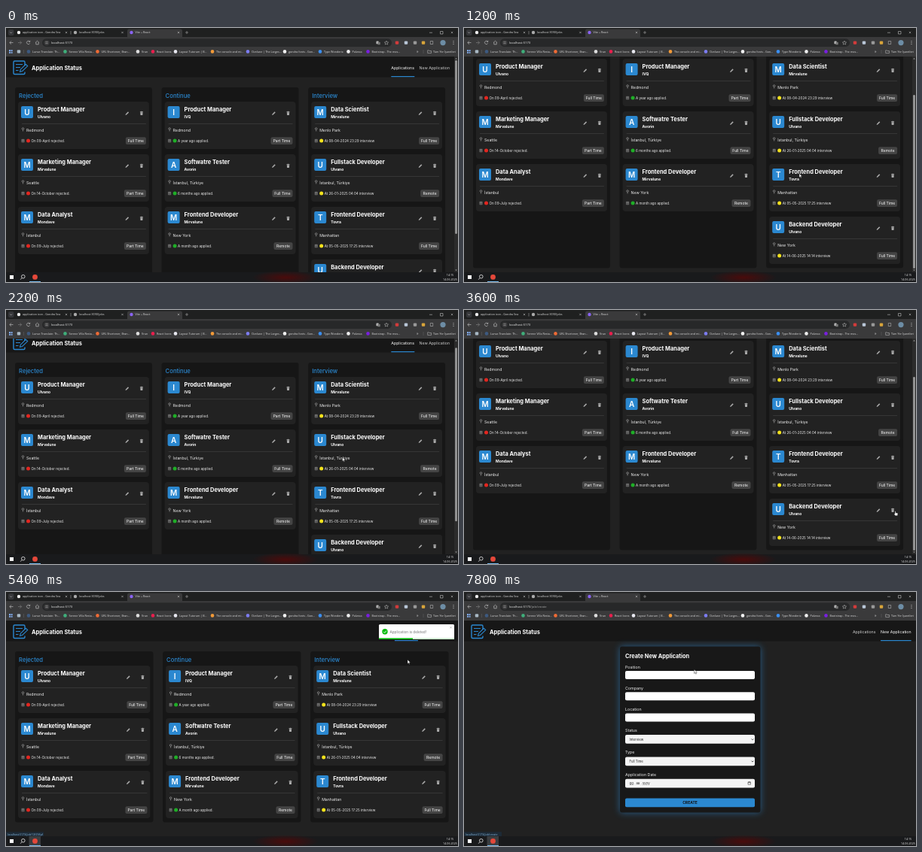
Write an HTML page that moves like this. It is 600x338 px and loops after 8 s.

```html
<!DOCTYPE html>
<html lang="en">
<head>
<meta charset="utf-8">
<title>Application Status</title>
<style>
  html, body { margin: 0; width: 100%; height: 100%; overflow: hidden; background: #202020; }
  svg { display: block; width: 100vw; height: 100vh; font-family: Inter, "Open Sans", sans-serif; }
  .ui { font-family: "Open Sans", "Noto Sans", sans-serif; }
</style>
</head>
<body>
<svg id="stage" viewBox="0 0 600 338" xmlns="http://www.w3.org/2000/svg"></svg>
<script>
const BLUE = '#2b88d0', LOOP = 8000, STEP = 200;

// ---- drawing helpers
const rect = (x, y, w, h, fill, r = 0, more = '') =>
  `<rect x="${x}" y="${y}" width="${w}" height="${h}" rx="${r}" fill="${fill}" ${more}/>`;
const dot = (x, y, r, fill) => `<circle cx="${x}" cy="${y}" r="${r}" fill="${fill}"/>`;
const line = (d, color = '#ccc', w = 0.6, more = '') =>
  `<path d="${d}" fill="none" stroke="${color}" stroke-width="${w}" ${more}/>`;
const text = (x, y, size, str, fill = '#fff', more = '') =>
  `<text x="${x}" y="${y}" font-size="${size}" fill="${fill}" ${more}>${str}</text>`;
const use = (id, x, y) => `<use href="#${id}" x="${x}" y="${y}"/>`;
const bold = 'font-weight="700"', mid = 'text-anchor="middle"';

const defs = `<defs>
  <clipPath id="view"><rect y="38" width="600" height="287"/></clipPath>
  <filter id="blur" x="-20%" y="-20%" width="140%" height="140%"><feGaussianBlur stdDeviation="5"/></filter>
  <radialGradient id="red"><stop stop-color="#4a0b0b"/><stop offset="1" stop-color="#4a0b0b" stop-opacity="0"/></radialGradient>
  <g id="pencil"><path d="M-2.4 2.4L-2 .9 1.1-2.2 2.2-1.1-.9 2Z" fill="#aaa"/></g>
  <g id="trash"><path d="M-2-2.3H-.8L-.5-2.7H.5L.8-2.3H2V-1.6H-2ZM-1.7-1.2H1.7L1.4 2.6H-1.4Z" fill="#aaa"/></g>
  <g id="pin"><circle cy="-1" r="1.3" fill="none" stroke="#aaa" stroke-width=".6"/><path d="M0 .3V2.5" stroke="#aaa" stroke-width=".6"/></g>
  <g id="date"><path d="M-1.7-1.7H1.7V2H-1.7Z" fill="#555" stroke="#888" stroke-width=".4"/><path d="M-1.7-.7H1.7M-.9-2.3V-1.4M.9-2.3V-1.4" stroke="#999" stroke-width=".4"/></g>
  <g id="cross"><path d="M-1.2-1.2L1.2 1.2M1.2-1.2L-1.2 1.2" stroke="#ccc" stroke-width=".5"/></g>
  <g id="arrow"><path d="M0 0V5.4L1.3 4.3 2.2 6.2 3 5.8 2.1 4H3.8Z" fill="#fff" stroke="#111" stroke-width=".4"/></g>
  <g id="hand"><path d="M-.5.4Q0-.3.6.4V2.3L2.9 2.8Q3.5 3 3.4 3.7L2.9 6.2H0L-1.7 3.9Q-1.5 3.2-.5 3.8Z" fill="#fff" stroke="#111" stroke-width=".4"/></g>
</defs>`;

// ---- browser window
function tab(x, icon, label, close) {
  return dot(x, 6, 2.2, icon) + text(x + 5, 7.4, 3.7, label, '#ddd') + use('cross', close, 6);
}

const bookmarks = [
  [30, '#3d5a80', 'Lunvo Translate: Th...'], [78.5, '#3fae7a', 'Serene Villa Resta...'],
  [121.5, '#ef6b35', 'URL Shortener, Bran...'], [175, '#ddd', 'Vrun'], [195, '#e91e4d', 'React Icons'],
  [225, '#e8e8f0', 'Layout Tutorum | B...'], [274, '#f29a38', 'The console and mi...'],
  [321, '#7c7cf0', 'Ovelune | The Larges...'], [370, '#f1f1f1', 'gondra fonts - Gon...'],
  [417, '#3b8ff0', 'Type Wonderix'], [454.5, '#eee', 'Palvexa'], [480.5, '#7a1fe0', 'Bootstrap - The mos...']
];

function chrome() {
  const tools = [[519, '#d33b3b'], [531, '#b9c7d8'], [543, '#999'], [554, '#d9a53a']];
  return rect(0, 0, 600, 13, '#1f2020') + rect(0, 12, 600, 26, '#3a3a3b') +
    rect(3, 2, 7.5, 8, '#36373a', 2) + line('M5.4 5.4L6.7 6.8 8 5.4') +
    rect(161, 1.5, 73, 13, '#3a3a3b', 2.5) +
    tab(17, '#eee', 'application icon - Gondra Sea', 80) +
    tab(92, '#aaa', 'localhost:9090/jobs', 154.5) +
    tab(166.5, '#8a63f5', 'Vite + React', 229) +
    line('M86 4V8.5M238 6H242M240 4V8', '#bbb', 0.5) +
    line('M562 6.2H566M576.5 4.5H580V8H576.5Z', '#ddd', 0.5) + use('cross', 592, 6) +
    line('M9.5 19.5H5M7 17.3L4.8 19.5 7 21.7') +
    line('M16 19.5H20.5M18.5 17.3L20.7 19.5 18.5 21.7', '#888') +
    line('M31.4 18A2.2 2.2 0 1 0 31.7 20.3M31.8 16.7V18.4H30') +
    line('M39 19.5L41.5 17.2 44 19.5M39.8 19V21.8H43.2V19') +
    rect(48, 14.3, 464, 10.6, '#272829', 5.3) + dot(54, 19.6, 3.6, '#3a3a3b') +
    line('M52.3 18.6H55.7M52.3 20.6H55.7', '#ccc', 0.5) +
    text(60, 21.1, 4.2, 'localhost:5173<tspan id="path" fill="#aaa"></tspan>', '#eee') +
    rect(491.5, 17.5, 3.2, 3.8, '#bbb', 0.5) + rect(493.5, 18.7, 3.2, 3.6, '#777', 0.5) +
    line('M505 17L505.8 18.9 507.7 19 506.2 20.2 506.7 22 505 21 503.3 22 503.8 20.2 502.3 19 504.2 18.9Z', '#ccc', 0.45) +
    tools.map(([x, c]) => rect(x - 2.2, 17.4, 4.4, 4.4, c, 1)).join('') +
    line('M563.3 17.5H566.7V21.5H563.3Z', '#ccc', 0.5) + dot(580, 19.6, 3.6, '#6d8da5') +
    [17.6, 19.6, 21.6].map(y => dot(594, y, 0.5, '#ddd')).join('') +
    [4, 6.6].map(x => rect(x, 29, 2, 2, '#7fa9e8') + rect(x, 31.7, 2, 2, '#7fa9e8')).join('') +
    rect(14.8, 29.2, 4.4, 4.4, '#a8b8c4', 1) + line('M23.5 29V34', '#666', 0.5) +
    bookmarks.map(([x, c, s]) => dot(x, 31.4, 2.3, c) + text(x + 5, 32.7, 3.7, s, '#ddd')).join('') +
    text(545, 33, 5, '»', '#ddd') + line('M554 29V34', '#666', 0.5) +
    line('M559.7 29.8H561.5L562 30.5H564.5V33.4H559.7Z', '#ccc', 0.5) +
    text(567, 32.7, 3.7, 'Tüm Yer İşaretleri', '#ddd');
}

function taskbar() {
  return rect(0, 325, 600, 13, '#191a1c') +
    '<ellipse cx="371" cy="332" rx="44" ry="9" fill="url(#red)"/>' +
    rect(30.5, 325, 15.5, 13, '#3b3d40', 0, 'id="hover"') +
    rect(5, 329, 5, 5, '#fff') + '<circle cx="22.8" cy="330.8" r="2.3" fill="none" stroke="#eee" stroke-width=".8"/>' +
    line('M21.2 332.5L19.2 334.7', '#eee', 0.8) + dot(38.5, 331.4, 3.4, '#e5483a') +
    rect(31, 337, 15, 1, '#76b9ed') +
    text(589.5, 330.2, 3.7, '14:15', '#eee', mid) + text(589.5, 336, 3.7, '14.06.2025', '#eee', mid);
}

// ---- page content
const jobs = [
  ['Rejected', '#e3261f', [
    ['Product Manager', 'Ulvano', 'Redmond', 'On 09-April rejected.', 'Full Time'],
    ['Marketing Manager', 'Mirvalune', 'Seattle', 'On 14-October rejected.', 'Part Time'],
    ['Data Analyst', 'Mondave', 'İstanbul', 'On 09-July rejected.', 'Part Time']]],
  ['Continue', '#1fae27', [
    ['Product Manager', 'IVQ', 'Redmond', 'A year ago applied.', 'Part Time'],
    ['Softwatre Tester', 'Avorin', 'İstanbul, Türkiye', '6 months ago applied.', 'Full Time'],
    ['Frontend Developer', 'Mirvalune', 'New York', 'A month ago applied.', 'Remote']]],
  ['Interview', '#f4e31c', [
    ['Data Scientist', 'Mirvalune', 'Menlo Park', 'At 08-04-2024 23:29 interview', 'Full Time'],
    ['Fullstack Developer', 'Ulvano', 'İstanbul, Türkiye', 'At 26-01-2025 04:04 interview', 'Remote'],
    ['Frontend Developer', 'Tovra', 'Manhattan', 'At 05-05-2025 17:25 interview', 'Full Time'],
    ['Backend Developer', 'Ulvano', 'New York', 'At 14-06-2025 14:14 interview', 'Full Time']]]
];
const badgeWidth = { 'Full Time': 27, 'Part Time': 29, Remote: 25 };

function card(x, y, w, color, [title, firm, place, note, type]) {
  const bw = badgeWidth[type], r = x + w;
  return rect(x, y, w, 63, '#222', 4) + rect(x + 4, y + 6, 16, 16, BLUE, 2) +
    text(x + 12, y + 17.6, 10, firm[0], '#fff', `${mid} font-weight="600"`) +
    text(x + 26, y + 13.2, 7.45, title, '#fff', bold) + text(x + 26, y + 21.5, 5, firm, '#fff', bold) +
    use('pencil', r - 29, y + 15.5) + use('trash', r - 10, y + 15.5) +
    rect(x + 5, y + 29, w - 9, 0.5, '#4a4a4a') +
    use('pin', x + 6.5, y + 37) + text(x + 11, y + 39.8, 5.2, place, '#eee') +
    use('date', x + 6.5, y + 52) + dot(x + 13.5, y + 52, 2.5, color) +
    text(x + 17.5, y + 53.7, 4.5, note, '#eee') +
    rect(r - 4 - bw, y + 47.2, bw, 9.8, '#444', 2) +
    text(r - 4 - bw / 2, y + 54, 5, type, '#fff', mid);
}

function board(wide) {
  const colW = wide ? 183.4 : 181.9, gap = 12.7, rows = wide ? 3 : 4;
  return jobs.map(([name, color, list], i) => {
    const x = 12 + i * (colW + gap);
    return rect(x, 79, colW, rows * 70 + 17.5, '#161616', 3) + text(x + 5, 93, 7.7, name, BLUE, 'font-weight="500"') +
      list.slice(0, rows).map((job, k) => card(x + 4, 98 + k * 70, colW - 8, color, job)).join('');
  }).join('');
}

function form() {
  const rows = [['Position', 99.6, 105, 11], ['Company', 128, 133.3, 11], ['Location', 156, 161.5, 11],
    ['Status', 184, 190, 11.8, 'Interview'], ['Type', 213.4, 219.4, 11.8, 'Full Time'],
    ['Application Date', 243, 248.8, 11.8, 'gg . aa . yyyy']];
  return rect(207, 72.5, 186.5, 221, '#2b88d0', 3, 'filter="url(#blur)" opacity=".6"') +
    rect(207, 72.5, 186.5, 221, '#181818', 3) + text(214, 87.6, 7.4, 'Create New Application', '#fff', bold) +
    rows.map(([label, ly, y, h, value = '']) =>
      text(214, ly + 2, 5.3, label, '#eee') + rect(214, y, 172, h, value ? '#f4f4f4' : '#fff', 2) +
      text(219.5, y + 7.5, 4.3, value, '#222')).join('') +
    [196, 225.3].map(y => line(`M381.6 ${y - 0.6}L383 ${y + 0.8} 384.4 ${y - 0.6}`, '#111', 0.7)).join('') +
    line('M377 252.9H380.4V256.2H377ZM377 253.6H380.4M378 252.2V253M379.5 252.2V253', '#222', 0.5) +
    rect(214, 274.5, 172, 11.8, BLUE, 2) + text(300, 282.2, 5, 'CREATE', '#111', `${mid} ${bold}`);
}

function page(id, wide, active, body) {
  const links = [['Applications', 511.3, 31], ['New Application', 548.5, 40.5]];
  return `<g id="${id}">` + rect(0, 38, 600, 27.5, '#171717') +
    line('M25 50V45.5Q25 44 23.5 44H11.5Q10 44 10 45.5V60Q10 61.5 11.5 61.5H23.5Q25 61.5 25 60V58.5', BLUE, 1.4) +
    line('M13 48.5H22M13 52.5H19M13 56.5H16.5', BLUE, 1.1) +
    line('M18.5 58.3L19.3 55.2 26.3 48.3 28.7 50.6 21.6 57.5Z', BLUE, 1.1) +
    text(34, 55.8, 7.45, 'Application Status', '#fff', bold) +
    links.map(([s, x, w], i) => {
      x += wide ? 4.6 : 0;
      return text(x, 54.6, 5.25, s, i === active ? '#fff' : '#ccc') + (i === active ? rect(x, 64, w, 1.2, BLUE) : '');
    }).join('') + body + '</g>';
}

const scrollbar = '<g id="bar">' + rect(595, 38, 5, 287, '#2b2b2b') +
  '<path d="M596.3 41.5L597.5 39.7 598.7 41.5ZM596.3 321.5L597.5 323.3 598.7 321.5Z" fill="#9a9a9a"/>' +
  rect(596.2, 43, 2.6, 231, '#9f9f9f', 1.3, 'id="thumb"') + '</g>';

const toast = '<g id="toast">' + rect(495, 43, 100, 20, '#fff', 1.5) + rect(495, 61.4, 100, 1.6, '#c9efca') +
  rect(495, 61.4, 100, 1.6, '#07bc0c', 0, 'id="progress"') + dot(503, 52.8, 3.7, '#07bc0c') +
  line('M501.2 52.9L502.6 54.3 504.9 51.5', '#fff', 0.9) +
  text(509.5, 54.5, 4.65, 'Application is deleted!', '#757575') +
  line('M589.4 46.2L591.6 48.4M591.6 46.2L589.4 48.4', '#888', 0.5) + '</g>';

const status = '<g id="status" class="ui">' + rect(0, 319.2, 50, 6, '#1d2a36') +
  text(2, 323.6, 3.6, '', '#86b7dd', 'id="link"') + '</g>';

document.getElementById('stage').innerHTML = defs + rect(0, 0, 600, 338, '#212121') +
  '<g clip-path="url(#view)">' + page('before', false, 0, board(false)) + page('after', true, 0, board(true)) +
  page('create', true, 1, form()) + scrollbar + toast + '</g>' +
  status + `<g class="ui">${chrome()}${taskbar()}</g>` + use('arrow', 0, 0).replace('<use', '<use id="cursor"');

// ---- motion
const $ = id => document.getElementById(id);
const show = (id, on) => $(id).setAttribute('display', on ? 'inline' : 'none');
const shift = (id, x, y) => $(id).setAttribute('transform', `translate(${x} ${y})`);

// Keys are [time, value, value...]; values run linearly between them.
function at(keys, t) {
  let i = keys.findIndex(k => k[0] > t);
  if (i < 0) return keys[keys.length - 1].slice(1);
  if (i === 0) return keys[0].slice(1);
  const a = keys[i - 1], b = keys[i], p = (t - a[0]) / (b[0] - a[0]);
  return a.slice(1).map((v, n) => v + (b[n + 1] - v) * p);
}

const scrollKeys = [[300, 0], [650, 31], [1000, 57], [1250, 57], [1500, 26], [1750, 0], [2120, 0], [2200, 9], [2400, 44], [2600, 57]];
const cursorKeys = [[200, 445, 193.5], [1200, 445, 193.5], [2200, 446.5, 196], [2800, 446.5, 196], [3400, 572.5, 267.5],
  [4400, 572.5, 267.5], [5200, 533, 90], [6000, 533, 90], [6700, 560, 55], [7400, 560, 55], [7800, 305.5, 103]];
const toastKeys = [[3750, 105], [3950, -5], [4150, 2], [4350, 0], [6750, 0], [6830, -4], [6980, 105]];
const DELETED = 3800, OPENED = 7600;

function draw(t) {
  const deleted = t >= DELETED, opened = t >= OPENED;
  show('before', !deleted);
  show('after', deleted && !opened);
  show('create', opened);
  show('bar', !deleted);
  const [y] = at(scrollKeys, t);
  shift('before', 0, -y);
  shift('thumb', 0, y * 46 / 57);

  show('toast', deleted && t < 7000);
  shift('toast', at(toastKeys, t)[0], 0);
  $('progress').setAttribute('width', 100 * Math.min(1, Math.max(0, 1 - (t - 3750) / 3000)));

  show('status', t >= 4600);
  show('hover', t >= 4600);
  $('link').textContent = 'localhost:5173/job/' + (t < 6800 ? '12f294pf' : 'create');
  $('path').textContent = opened ? '/job/create' : '';

  const [cx, cy] = at(cursorKeys, t);
  const pointing = (t >= 3400 && t < 4600) || (t >= 6800 && t < OPENED);
  show('cursor', t >= 200);
  $('cursor').setAttribute('href', pointing ? '#hand' : '#arrow');
  shift('cursor', cx, cy);
}

const start = performance.now();
function tick() {
  const t = (performance.now() - start) % LOOP;
  draw(Math.floor(t / STEP) * STEP);
  requestAnimationFrame(tick);
}
tick();
</script>
</body>
</html>
```
